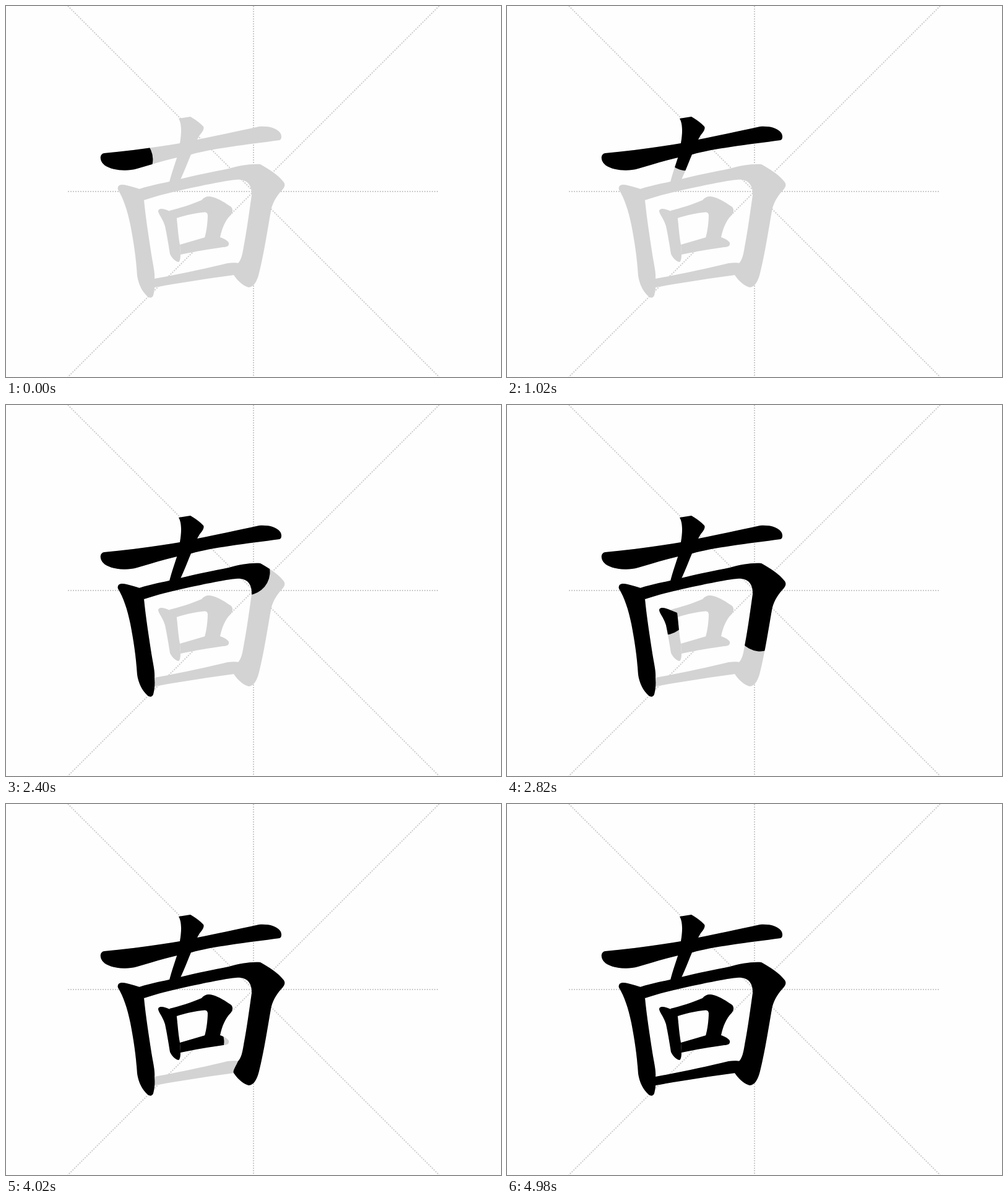
Animation, 800 px wide and 600 px high, one loop 5100 ms. Source, as an HTML page:

```html
<!DOCTYPE html>
<html>
<head>
<meta charset="utf-8">
<style>
html, body { margin: 0; width: 100%; height: 100%; overflow: hidden; background: #fefefe; }
svg { display: block; width: 800px; height: 600px; }
.grid { stroke: #ccc; stroke-width: 2; stroke-dasharray: 2 2; fill: none; }
.brush { fill: none; stroke: #000; stroke-width: 75; stroke-linecap: round; stroke-linejoin: round; }
</style>
</head>
<body>
<svg viewBox="0 0 800 600">
  <path class="grid" d="M100 0L700 600M700 0L100 600M400 0V600M100 300H698"/>
  <g id="base" fill="#d3d3d3"></g>
  <g id="ink"></g>
</svg>
<script>
const LOOP = 5100, STEP = 60;

// Each stroke: start time in ms, brush path, outline.
const strokes = [
  [-148, 'M165 249L205 248L430 208',
    'M159 238C151 239 150 250 160 258C172 266 195 268 212 263L236 256C255 250 275 245 300 240C330 231 390 224 442 217C446 216 446 209 443 205C437 197 424 194 409 195C372 203 340 210 309 216L281 222C240 229 200 234 159 238Z'],
  [727, 'M292 186L300 200L289 235L270 285',
    'M279 182L298 179C303 182 313 188 319 195C321 199 317 204 313 209C305 222 302 233 299 240C294 252 288 268 279 287C276 293 271 296 266 295C262 293 263 288 265 281C268 270 272 258 276 246C278 238 280 230 281 222C284 205 284 190 279 182Z'],
  [1262, 'M190 297L205 330L225 428L233 460',
    'M182 291C185 288 190 289 195 290C203 292 210 294 216 296L223 314C226 345 231 375 235 402C238 420 241 432 240 442C241 452 240 460 238 468C236 473 232 472 229 470C220 462 214 450 212 436C210 405 206 380 201 354C196 330 190 312 181 297C180 295 181 292 182 291Z'],
  [1720, 'M218 305L300 284L389 270L417 285L409 361L392 440',
    'M212 297C235 289 258 286 281 280C310 273 335 268 360 263C377 258 395 255 411 256C425 264 440 273 449 285C452 290 450 294 445 299C436 309 430 320 428 332C423 360 417 400 409 432C406 444 401 455 392 455C385 453 376 447 368 435C366 432 371 425 375 416C380 411 382 402 384 390C388 370 393 335 397 306C398 293 392 282 379 281C370 280 345 285 315 291C280 298 250 305 223 314Z'],
  [2790, 'M252 331L266 350L275 405',
    'M246 332C246 327 253 327 260 330L275 336C277 350 278 370 281 386L282 401C282 408 281 413 279 414C275 414 268 408 265 401C263 388 260 370 257 356C253 343 247 338 246 332Z'],
  [3200, 'M268 336L332 320L347 332L333 375',
    'M264 331C280 327 300 321 316 314C321 308 327 307 334 309C345 312 355 319 364 325C367 329 367 333 363 338C354 347 349 360 346 374L332 379C328 379 322 378 321 375C324 365 326 350 326 338C325 333 322 333 316 334C300 336 288 339 276 343Z'],
  [3760, 'M284 393L313 385L352 383',
    'M281 386L322 374L346 374C352 376 358 379 360 383C361 388 357 390 351 390C330 393 305 397 282 402Z'],
  [4285, 'M245 447L368 425',
    'M240 441C280 434 325 424 358 416C365 415 372 415 377 416L369 435C325 441 285 447 240 455Z']
];

function add(parent, tag, attrs) {
  const el = document.createElementNS('http://www.w3.org/2000/svg', tag);
  for (const key in attrs) el.setAttribute(key, attrs[key]);
  return parent.appendChild(el);
}

const base = document.getElementById('base');
const ink = document.getElementById('ink');

const parts = strokes.map(([start, line, outline], i) => {
  add(base, 'path', { d: outline });
  add(add(ink, 'clipPath', { id: 'clip' + i }), 'path', { d: outline });
  const brush = add(ink, 'path', { d: line, class: 'brush', 'clip-path': `url(#clip${i})` });
  const full = add(ink, 'path', { d: outline });
  const length = brush.getTotalLength();
  return { start, brush, full, length, duration: 360 + 2.9 * length };
});

function draw(time) {
  for (const { start, brush, full, length, duration } of parts) {
    const progress = (time - start) / duration;
    const done = progress >= 1;
    full.style.display = done ? '' : 'none';
    brush.style.display = progress > 0 && !done ? '' : 'none';
    brush.style.strokeDasharray = `${Math.max(0, progress) * length} 2000`;
  }
}

const begin = performance.now();
function tick() {
  const time = (performance.now() - begin) % LOOP;
  draw(Math.min(Math.floor(time / STEP) * STEP, LOOP - 2 * STEP));
  requestAnimationFrame(tick);
}
tick();
</script>
</body>
</html>
```
